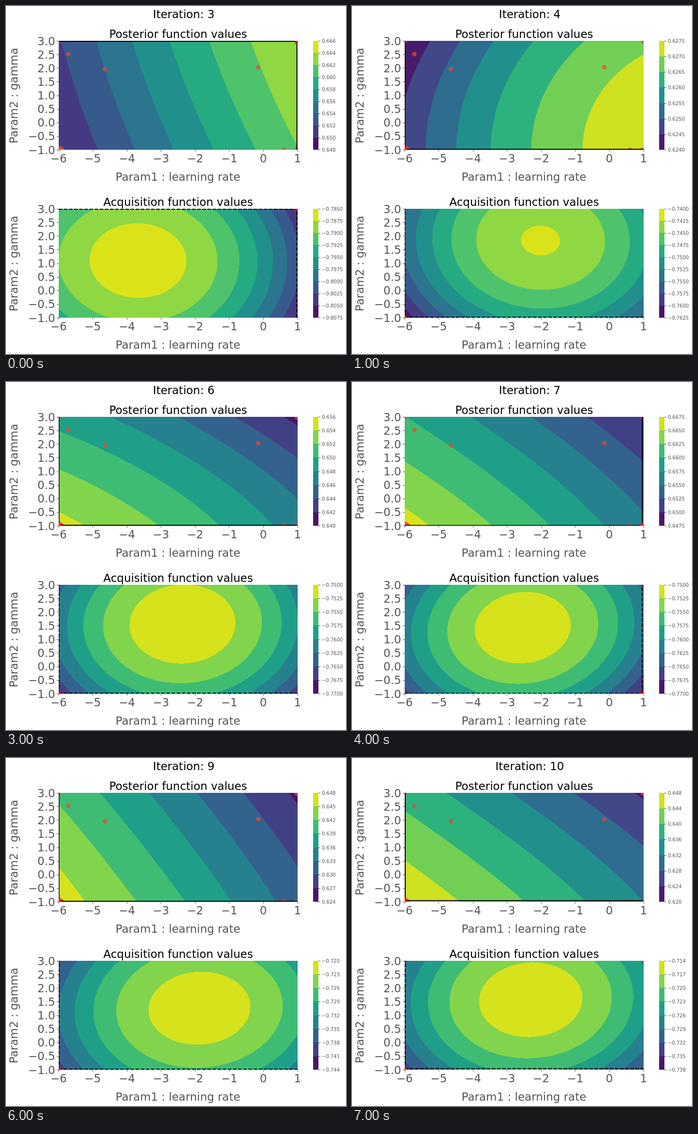
Animation of 703 by 719 pixels, one loop 8000 ms. Source, as an HTML page with a canvas:

```html
<!DOCTYPE html>
<html lang="en">
<head>
<meta charset="utf-8">
<title>Bayesian optimisation</title>
<style>
  html, body { margin: 0; width: 100%; height: 100%; overflow: hidden; background: #fff; }
  canvas, svg { position: absolute; left: 0; top: 0; display: block; }
  text { font-family: "DejaVu Sans", sans-serif; font-size: 23px; fill: #555; }
  .mid { text-anchor: middle; }
  .end { text-anchor: end; }
  .title { fill: #000; }
  .small { font-size: 10px; }
  .tick { stroke: #555; stroke-width: 1; shape-rendering: crispEdges; }
  .best { stroke: #000; stroke-width: 2; }
  .dash { stroke-dasharray: 7.4 3.2; }
  .dot { fill: #e24a33; fill-opacity: .7; }
</style>
</head>
<body>
<canvas id="bands" width="703" height="719"></canvas>
<svg id="marks" width="703" height="719" viewBox="0 0 703 719"></svg>
<script>
const LEFT = 109, WIDTH = 494, HEIGHT = 225, TOPS = [72, 419], STEP_MS = 1000;
const ctx = document.getElementById('bands').getContext('2d');
const marks = document.getElementById('marks');

const VIRIDIS = ('440154 481567 482677 453781 404788 39568c 33638d 2d708e 287d8e 238a8d ' +
  '1f968b 20a387 29af7f 3cbb75 55c667 73d055 95d840 b8de29 dce319 fde725').split(' ')
  .map(h => [0, 2, 4].map(i => parseInt(h.substr(i, 2), 16)));

function viridis(t) {
  const p = t * 19, i = Math.min(18, Math.floor(p));
  return VIRIDIS[i].map((c, k) => Math.round(c + (VIRIDIS[i + 1][k] - c) * (p - i)));
}

const palette = n => Array.from({ length: n }, (_, i) => viridis((i + .5) / n));

// Parabola through three values at -1, 0 and 1.
const bend = (a, b, c, t) => b + (c - a) / 2 * t + ((a + c) / 2 - b) * t * t;

// Surface through band values on the top, middle and bottom row.
const sheet = (top, mid, low) => (x, y) => {
  const u = (x - LEFT) / WIDTH * 2 - 1, v = (y - TOPS[0]) / HEIGHT * 2 - 1;
  return bend(bend(...top, u), bend(...mid, u), bend(...low, u), v);
};

// Elliptic hill: peak value, squared radius per band, centre, aspect, tilt.
const hill = (peak, area, cx, cy, aspect, tilt) => (x, y) => {
  const dx = x - cx, dy = (y - cy - tilt * dx) / aspect;
  return peak - (dx * dx + dy * dy) / area;
};

const scale = (count, low, step, digits) => ({ count, low, step, digits });

const scenes = [];
const scene = (best, scaleP, fieldP, scaleA, fieldA) =>
  scenes.push({ best, plots: [{ ...scaleP, field: fieldP }, { ...scaleA, field: fieldA }] });

scene([601.5, 73],
  scale(9, .648, .002, 3), sheet([1.92, 5.22, 8.07], [1.47, 4.71, 7.57], [.92, 4.11, 6.96]),
  scale(9, -.8075, .0025, 4), hill(8.59, 17000, 273, 526, .77, .01));
scene([109.5, 296],
  scale(7, .624, .0005, 4), sheet([.05, 3.78, 5.75], [.95, 4.57, 6.55], [1.26, 4.84, 6.8]),
  scale(9, -.7625, .0025, 4), hill(8.1, 16200, 390, 484.5, .763, .015));
scene([109.5, 296],
  scale(8, .637, .001, 3), sheet([4.24, 2.85, .43], [5.88, 4.66, 2.5], [7.28, 6, 3.87]),
  scale(9, -.7675, .0025, 4), hill(8.19, 15300, 378, 492.5, .75, -.01));
scene([109.5, 296],
  scale(8, .64, .002, 3), sheet([4.6, 3, .7], [6.05, 4.5, 2.35], [7.3, 5.7, 3.5]),
  scale(8, -.77, .0025, 4), hill(7.8, 15000, 365, 500, .745, -.02));
scene([600, 296.5],
  scale(8, .6475, .0025, 4), sheet([5.02, 3.12, .92], [6.22, 4.37, 2.2], [7.38, 5.46, 3.23]),
  scale(8, -.77, .0025, 4), hill(7.68, 14500, 353, 507.5, .742, -.05));
scene([109, 72.3],
  scale(9, .63, .003, 3), sheet([7.07, 4.05, .68], [7.7, 4.66, 1.32], [8.21, 5.14, 1.81]),
  scale(7, -.756, .004, 3), hill(6.59, 22000, 435, 535, .711, -.025));
scene([109.5, 296],
  scale(8, .624, .003, 3), sheet([5.8, 3.4, .8], [6.7, 4.3, 1.7], [7.5, 5.15, 2.5]),
  scale(8, -.744, .003, 3), hill(7.6, 18500, 400, 517, .715, -.03));
scene([110, 294.8],
  scale(7, .62, .004, 3), sheet([4.62, 2.8, .84], [5.74, 3.97, 2.02], [6.79, 5.01, 3]),
  scale(8, -.738, .003, 3), hill(7.68, 16800, 369.5, 499.5, .72, -.03));

const DOTS = [[129, 99.5], [204.5, 130.5], [521.5, 126.5], [575, 297], [601, 297],
  [601.5, 73], [109.5, 72], [111, 293], [114, 296], [116.5, 297], [110, 297]];

const minus = s => String(s).replace('-', '\u2212');
const label = (x, y, s, cls, extra = '') => `<text x="${x}" y="${y}" class="${cls}" ${extra}>${minus(s)}</text>`;
const line = (x1, y1, x2, y2, cls) => `<line x1="${x1}" y1="${y1}" x2="${x2}" y2="${y2}" class="${cls}"/>`;

function star(x, y, alpha) {
  const pts = Array.from({ length: 10 }, (_, i) => {
    const r = i % 2 ? 3 : 8, a = i * Math.PI / 5;
    return `${(x + r * Math.sin(a)).toFixed(2)},${(y - r * Math.cos(a)).toFixed(2)}`;
  });
  return `<polygon points="${pts.join(' ')}" fill="red" fill-opacity="${alpha}"/>`;
}

function axes(top, title) {
  const bottom = top + HEIGHT, mid = top + HEIGHT / 2 + .7;
  let out = label(356, top - 6, title, 'mid title') +
    label(355.5, bottom + 64, 'Param1 : learning rate', 'mid') +
    label(24, mid, 'Param2 : gamma', 'mid', `transform="rotate(-90 24 ${mid})"`);
  for (let i = 0; i <= 7; i++) {
    const x = LEFT + i * WIDTH / 7;
    out += line(x, bottom, x, bottom + 4, 'tick') + label(x - .3, bottom + 26.3, i - 6, 'mid');
  }
  for (let i = 0; i <= 8; i++) {
    const y = top + i * HEIGHT / 8;
    out += line(LEFT - 4, y + .5, LEFT, y + .5, 'tick') +
      label(101.6, y + 8.6, (3 - i / 2).toFixed(1), 'end');
  }
  return out;
}

function colorbar(top, { count, low, step, digits }) {
  const h = HEIGHT / count;
  let out = '';
  palette(count).forEach((c, i) => {
    out += `<rect x="635" y="${top + HEIGHT - (i + 1) * h}" width="11" height="${h}" fill="rgb(${c})" shape-rendering="crispEdges"/>`;
  });
  for (let i = 0; i <= count; i++) {
    const y = top + HEIGHT - i * h;
    out += line(646, y + .5, 650, y + .5, 'tick') +
      label(653, y + 4, (low + i * step).toFixed(digits), 'small');
  }
  return out;
}

function paintBands(top, { count, field }) {
  const img = ctx.createImageData(WIDTH, HEIGHT), colors = palette(count);
  for (let y = 0, p = 0; y < HEIGHT; y++) {
    for (let x = 0; x < WIDTH; x++, p += 4) {
      const band = Math.floor(field(LEFT + x + .5, top + y + .5));
      const c = colors[Math.max(0, Math.min(count - 1, band))];
      img.data[p] = c[0];
      img.data[p + 1] = c[1];
      img.data[p + 2] = c[2];
      img.data[p + 3] = 255;
    }
  }
  ctx.putImageData(img, LEFT, top);
}

function overlay(top, [x, by], isPosterior) {
  const y = by + top - TOPS[0], cls = isPosterior ? 'best' : 'best dash';
  const dots = isPosterior
    ? DOTS.map(d => `<circle cx="${d[0]}" cy="${d[1]}" r="4.7" class="dot"/>`).join('') : '';
  return `<g clip-path="url(#clip${top})">` + dots +
    line(LEFT, y, LEFT + WIDTH, y, cls) + line(x, top + HEIGHT, x, top, cls) +
    star(x, y, isPosterior ? .9 : .7) + '</g>';
}

const frame = '<defs>' + TOPS.map(t =>
  `<clipPath id="clip${t}"><rect x="${LEFT}" y="${t}" width="${WIDTH}" height="${HEIGHT}"/></clipPath>`).join('') +
  '</defs>' + axes(TOPS[0], 'Posterior function values') + axes(TOPS[1], 'Acquisition function values');

function show(i) {
  const { best, plots } = scenes[i];
  let out = frame + label(367.5, 25.3, 'Iteration: ' + (i + 3), 'mid title');
  plots.forEach((plot, k) => {
    paintBands(TOPS[k], plot);
    out += colorbar(TOPS[k], plot) + overlay(TOPS[k], best, k === 0);
  });
  marks.innerHTML = out;
}

let shown = -1;
const start = performance.now();
function tick() {
  const i = Math.floor((performance.now() - start) / STEP_MS) % scenes.length;
  if (i !== shown) show(shown = i);
  requestAnimationFrame(tick);
}
tick();
</script>
</body>
</html>
```
